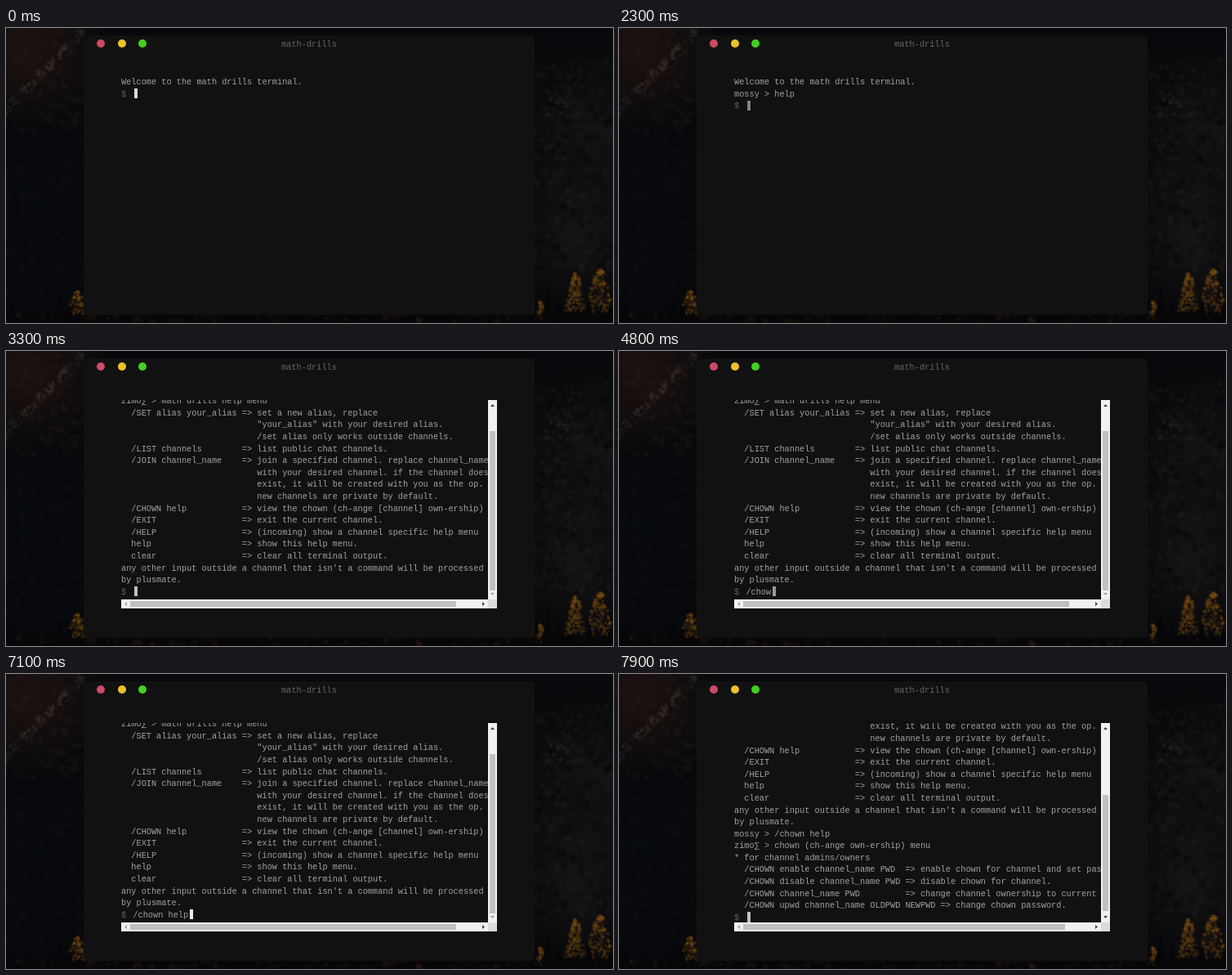
Animation, 743 px wide and 361 px high, one loop 8000 ms. Source, as an HTML page with a canvas:

```html
<!DOCTYPE html>
<html lang="en">
<head>
<meta charset="utf-8">
<title>math-drills</title>
<style>
  html, body { margin: 0; width: 100%; height: 100%; overflow: hidden; background: #08080b; }
  #stage { position: relative; width: 743px; height: 361px; overflow: hidden;
    font: 10.28px/14.6px "Liberation Mono", monospace; color: #a2a2a2; }
  #stage * { position: absolute; }
  #window { left: 95px; top: 9px; width: 552px; height: 342px; border-radius: 4px; background: #111; }
  .dot { top: 5px; width: 10px; height: 10px; border-radius: 50%; }
  #title { left: 0; width: 100%; top: 3.5px; text-align: center; color: #666; }
  #view { left: 141px; top: 60px; width: 460px; height: 255px; overflow: hidden; }
  #content { left: 0; top: -1px; }
  #log, #prompt span { white-space: pre; }
  #prompt { left: 0; }
  #sign { color: #5e5e5e; }
  #typed { left: 14.4px; }
  #cursor { top: 0.4px; width: 4.4px; height: 12.2px; }
  #bars { inset: 0; }
  .track { background: #f1f1f1; }
  .thumb { background: #c1c1c1; }
  .corner { left: 449px; top: 244px; width: 11px; height: 11px; background: #dcdcdc; }
</style>
</head>
<body>
<div id="stage">
  <canvas id="scenery" width="743" height="361"></canvas>
  <div id="window">
    <div class="dot" style="left:16px;background:#cd4a66"></div>
    <div class="dot" style="left:41.5px;background:#edc12a"></div>
    <div class="dot" style="left:67px;background:#42d11f"></div>
    <div id="title">math-drills</div>
  </div>
  <div id="view">
    <div id="content">
      <div id="log"></div>
      <div id="prompt"><span id="sign">$</span><span id="typed"></span><div id="cursor"></div></div>
    </div>
    <div id="bars">
      <div class="track" style="left:449px;top:0;width:11px;height:244px"></div>
      <div class="track" style="left:0;top:244px;width:449px;height:11px"></div>
      <div class="corner"></div>
      <div class="thumb" id="thumbY" style="left:451px;width:7px"></div>
      <div class="thumb" id="thumbX" style="left:11px;top:246px;height:7px"></div>
      <svg width="460" height="255">
        <path id="up" d="M452 8l2.5-3 2.5 3z"/>
        <path id="down" d="M452 236l2.5 3 2.5-3z"/>
        <path fill="#a3a3a3" d="M7 247l-3 2.5 3 2.5z"/>
        <path fill="#404040" d="M442 247l3 2.5-3 2.5z"/>
      </svg>
    </div>
  </div>
</div>
<script>
const LOOP = 8000, ROW = 14.6, CHAR = 6.17, VIEW_H = 244, VIEW_W = 449;
const $ = id => document.getElementById(id);
const option = (name, info, column = 24) => ('  ' + name).padEnd(column) + '=> ' + info;
const more = info => ' '.repeat(27) + info;

const helpMenu = [
  'zimo∑ > math drills help menu',
  option('/SET alias your_alias', 'set a new alias, replace'),
  more('"your_alias" with your desired alias.'),
  more('/set alias only works outside channels.'),
  option('/LIST channels', 'list public chat channels.'),
  option('/JOIN channel_name', 'join a specified channel. replace channel_name'),
  more("with your desired channel. if the channel doesn't"),
  more('exist, it will be created with you as the op.'),
  more('new channels are private by default.'),
  option('/CHOWN help', 'view the chown (ch-ange [channel] own-ership)'),
  option('/EXIT', 'exit the current channel.'),
  option('/HELP', '(incoming) show a channel specific help menu'),
  option('help', 'show this help menu.'),
  option('clear', 'clear all terminal output.'),
  "any other input outside a channel that isn't a command will be processed",
  'by plusmate.'
];
const chownMenu = [
  'zimo∑ > chown (ch-ange own-ership) menu',
  '* for channel admins/owners',
  option('/CHOWN enable channel_name PWD', 'enable chown for channel and set password.', 34),
  option('/CHOWN disable channel_name PWD', 'disable chown for channel.', 34),
  option('/CHOWN channel_name PWD', 'change channel ownership to current user.', 34),
  option('/CHOWN upwd channel_name OLDPWD NEWPWD', 'change chown password.', 41)
];

// Lines added to the log, and the time each block appears.
const output = [
  [0, ['Welcome to the math drills terminal.']],
  [2170, ['mossy > help']],
  [2422, helpMenu],
  [7160, ['mossy > /chown help']],
  [7455, chownMenu]
];
const typing = [
  { text: 'help', keys: [950, 1180, 1450, 1750], enter: 2170 },
  { text: '/chown help', enter: 7160,
    keys: [3850, 4050, 4250, 4450, 4680, 4930, 5200, 5580, 5820, 6120, 6450] }
];
// [start of a prompt, time of its brightest cursor]
const blinks = [[0, 200], [2170, 2750], [2422, 3200], [7160, 7650], [7455, 8200]];
const scrolls = [[2422, 34], [7455, 102]];

const mod = (a, b) => ((a % b) + b) % b;
const swing = p => 0.5 - Math.cos(Math.PI * Math.min(1, Math.max(0, p))) / 2;
const easeOut = u => 1 - (1 - u) ** 2;

function cursorShade(t) {
  const peak = blinks.filter(([start]) => t >= start).pop()[1];
  const phase = mod(t - peak, 1000) / 500;
  const level = phase < 1 ? 1 - easeOut(phase) : easeOut(phase - 1);
  const grey = Math.round(105 + 135 * level);
  return `rgb(${grey},${grey},${grey})`;
}

function typedAt(t) {
  const line = typing.find(({ keys, enter }) => t >= keys[0] && t < enter);
  return line ? line.text.slice(0, line.keys.filter(k => t >= k).length) : '';
}

function render(t) {
  const lines = output.filter(([at]) => t >= at).flatMap(([, block]) => block);
  const text = lines.join('\n');
  if ($('log').textContent !== text) $('log').textContent = text;

  const typed = typedAt(t);
  $('typed').textContent = typed;
  $('prompt').style.top = lines.length * ROW + 'px';
  $('cursor').style.left = 16 + typed.length * CHAR + 'px';
  $('cursor').style.background = cursorShade(t);

  const scroll = scrolls.reduce((sum, [at, by]) => sum + by * swing((t - at) / 500), 0);
  $('content').style.transform = `translateY(${-Math.round(scroll)}px)`;

  const height = (lines.length + 1) * ROW + 0.6;
  $('bars').style.display = height > VIEW_H ? 'block' : 'none';
  $('thumbY').style.top = 11 + Math.floor(scroll / height * 222) + 'px';
  $('thumbY').style.height = Math.round(VIEW_H / height * 222) + 'px';
  $('thumbX').style.width = Math.round(VIEW_W / (t < 7455 ? 480.5 : 486.6) * 427) + 'px';
  const arrow = on => on ? '#404040' : '#a3a3a3';
  $('up').setAttribute('fill', arrow(scroll > 0.5));
  $('down').setAttribute('fill', arrow(height - VIEW_H - scroll > 1.2));
}

function paintScenery() {
  const c = $('scenery').getContext('2d');
  let seed = 7;
  const rnd = () => (seed = seed * 16807 % 2147483647) / 2147483647;
  const glow = (x, y, r, rgb, alpha) => {
    const g = c.createRadialGradient(x, y, 0, x, y, r);
    g.addColorStop(0, `rgba(${rgb},${alpha})`);
    g.addColorStop(1, `rgba(${rgb},0)`);
    c.fillStyle = g;
    c.fillRect(x - r, y - r, 2 * r, 2 * r);
  };
  const specks = (n, x, y, w, h, rgb, alpha, size) => {
    for (let i = 0; i < n; i++)
      glow(x + rnd() * w, y + rnd() * h, size * (0.5 + rnd()), rgb, alpha * rnd());
  };
  // Foliage that widens from the tip to the ground.
  const autumnTree = (n, x, top, w, h) => {
    for (let i = 0; i < n; i++) {
      const p = rnd();
      glow(x + (rnd() - 0.5) * w * Math.sqrt(p), top + p * h, 1.5 + 2 * rnd(), '135,82,14', 0.5 * rnd());
    }
  };
  const pine = (x, top, w) => {
    c.fillStyle = '#060507';
    c.beginPath();
    c.moveTo(x, top);
    c.lineTo(x + w, 361);
    c.lineTo(x - w, 361);
    c.fill();
  };

  c.fillStyle = '#07080b';
  c.fillRect(0, 0, 743, 361);
  glow(25, 25, 105, '40,23,17', 0.65);
  glow(20, 210, 110, '7,10,15', 0.8);
  glow(720, 130, 130, '25,22,23', 0.65);
  glow(700, 255, 100, '27,23,23', 0.7);
  glow(650, 30, 80, '8,8,11', 0.6);
  specks(220, 0, 0, 95, 130, '46,33,28', 0.3, 4);
  specks(150, 0, 130, 95, 200, '22,20,22', 0.35, 5);
  specks(420, 647, 40, 96, 260, '44,39,39', 0.3, 4);
  specks(160, 647, 50, 96, 250, '3,4,7', 0.6, 6);
  // Pale ridge in the upper left corner.
  for (let i = 0; i < 110; i++) {
    const p = rnd();
    glow(p * 95, 100 - 95 * p + (rnd() - 0.5) * 16, 1.5 + 2.5 * rnd(), '85,76,72', 0.22);
  }
  specks(40, 660, 75, 30, 35, '75,70,70', 0.25, 2.5);

  c.fillStyle = 'rgba(7,6,8,.8)';
  c.fillRect(0, 348, 743, 13);
  autumnTree(110, 87, 322, 22, 28);
  autumnTree(170, 697, 300, 26, 48);
  autumnTree(190, 727, 295, 32, 54);
  autumnTree(40, 654, 335, 14, 22);
  specks(130, 0, 350, 743, 11, '60,30,18', 0.4, 4);
  for (const [x, top] of [[8, 338], [28, 344], [66, 327], [78, 339], [663, 317], [677, 332], [714, 332], [740, 338]])
    pine(x, top, 7);
}

paintScenery();
(function tick() {
  render(performance.now() % LOOP);
  requestAnimationFrame(tick);
})();
</script>
</body>
</html>
```
